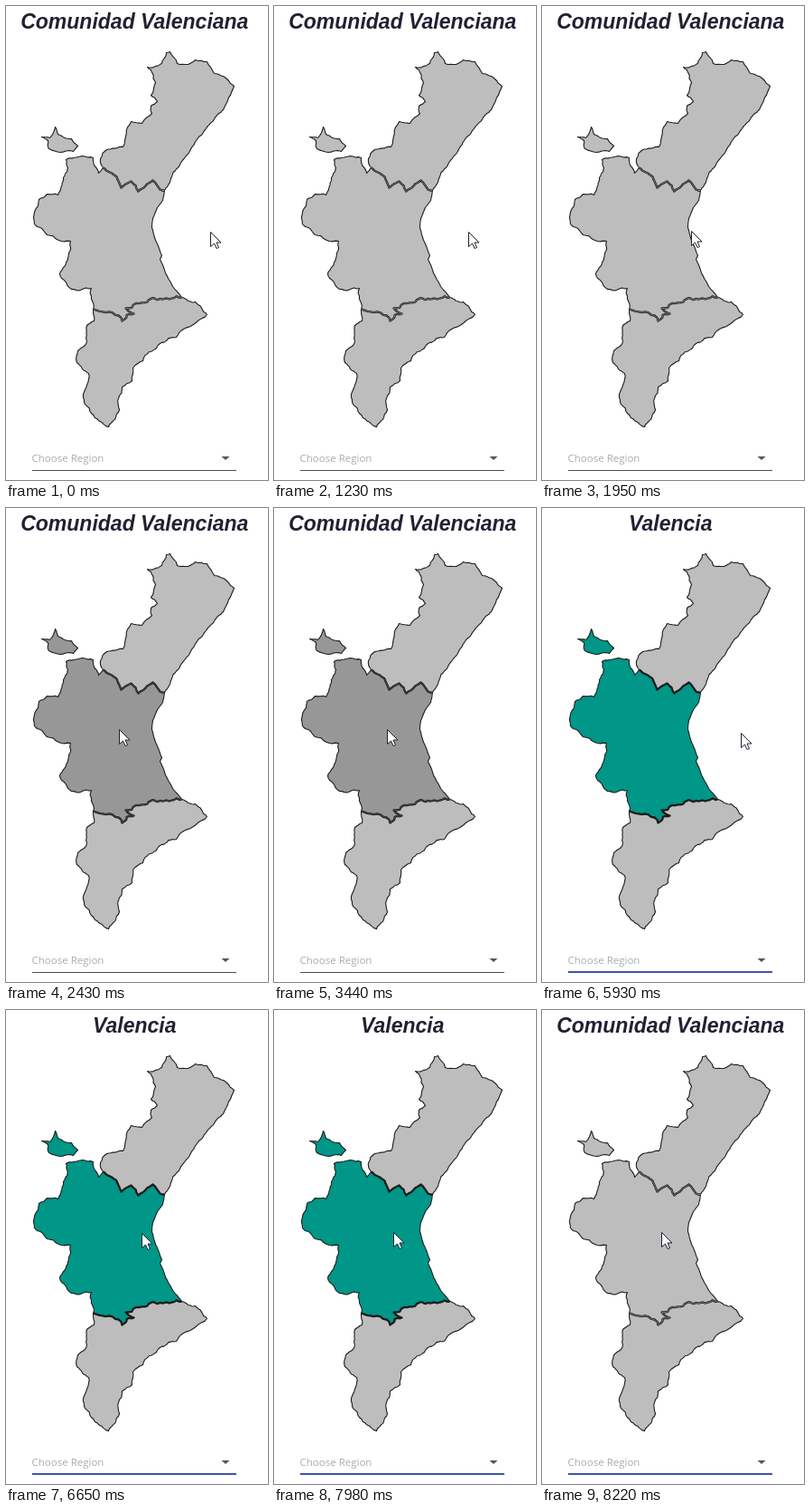
An HTML page with a canvas that plays this animation: 290x523 px, repeating every 9.3 s.

```html
<!DOCTYPE html>
<html lang="es">
<head>
<meta charset="utf-8">
<title>Region map</title>
<style>
html, body { margin: 0; width: 100%; height: 100%; overflow: hidden; background: #fff; }
canvas { display: block; width: 290px; height: 523px; }
</style>
</head>
<body>
<canvas id="stage"></canvas>
<script>
const W = 290, H = 523, LOOP = 9300;
const INK = '#1c1c1c', GREY = '#bdbdbd', HOVER = '#979797', TEAL = '#009688';
const HOVER_AT = 2030, SELECT_AT = 3670, RESET_AT = 8220;
const canvas = document.getElementById('stage');
const ctx = canvas.getContext('2d');
const ratio = window.devicePixelRatio || 1;
canvas.width = W * ratio;
canvas.height = H * ratio;

let seed = 11;
const random = () => (seed = (seed * 16807) % 2147483647) / 2147483647;

// Splits an edge at a shifted midpoint until the pieces are short.
function split(a, b, rough) {
  const dx = b[0] - a[0], dy = b[1] - a[1];
  if (Math.hypot(dx, dy) < 4) return [b];
  const shift = (random() - 0.5) * rough;
  const mid = [(a[0] + b[0]) / 2 - dy * shift, (a[1] + b[1]) / 2 + dx * shift];
  return [...split(a, mid, rough), ...split(mid, b, rough)];
}

// A natural-looking line through a few "x,y" key points.
function line(keys, rough = 0.25) {
  const pts = keys.split(' ').map(p => p.split(',').map(Number));
  return pts.flatMap((p, i) => i ? split(pts[i - 1], p, rough) : [p]);
}

const northWest = line('107,178 104,168 111,158 129,155 138,127 150,129 161,118 160,110 167,105 160,98 165,84 156,67 172,63 177,51');
const northEast = line('177,51 181,50 189,63 201,64 209,59 222,61 230,74 244,80 252,88', 0.2);
const northCoast = line('252,88 240,114 218,139 198,166 175,203', 0.15);
const northBorder = line('107,178 122,188 127,200 138,193 146,204 162,192 170,202 175,203');
const west = line('107,178 102,184 96,167 84,165 66,169 68,178 57,208 45,207 36,213 31,240 45,252 71,259 68,278 59,295 72,312 94,311 96,334');
const southBorder = line('96,334 124,341 128,347 141,339 132,333 156,326 172,323 194,321', 0.4);
const eastCoast = line('194,321 184,309 176,294 170,279 172,275 165,258 161,244 162,234 167,222 173,214 175,203', 0.06);
const south = line('194,321 209,326 222,340 196,356 188,365 158,381 151,391 140,399 139,413 128,420 125,445 113,464 94,449 85,428 91,405 78,393 79,380 87,374 89,352 97,347 96,334');
const islet = line('39,144 48,145 54,133 57,141 72,146 79,154 74,160 60,161 47,157 46,148 39,144', 0.2);

const back = pts => pts.slice().reverse();
const upper = [...northWest, ...northEast, ...northCoast, ...back(northBorder)];
const middle = [...west, ...southBorder, ...eastCoast, ...back(northBorder)];
const lower = [...south, ...southBorder];

function trace(pts) {
  ctx.beginPath();
  for (const [x, y] of pts) ctx.lineTo(x + 0.5, y + 0.5);
}

function stroke(color, width) {
  ctx.strokeStyle = color;
  ctx.lineWidth = width;
  ctx.stroke();
}

function region(pts, fill) {
  trace(pts);
  ctx.closePath();
  ctx.fillStyle = fill;
  ctx.fill();
  stroke(INK, 1.1);
}

function drawMap(fill) {
  region(upper, GREY);
  region(lower, GREY);
  region(middle, fill);
  region(islet, fill);
  for (const border of [northBorder, southBorder]) {
    trace(border);
    stroke(INK, 2.3);
    if (fill !== TEAL) stroke(fill === GREY ? '#909090' : '#555', 0.8);
  }
}

function drawTitle(text) {
  ctx.font = 'italic bold 23px "Liberation Sans", Arial, sans-serif';
  ctx.textAlign = 'center';
  ctx.fillStyle = '#212133';
  ctx.fillText(text, 142.3, 25);
}

function drawSelect(t) {
  ctx.font = '11.5px "Open Sans", "Noto Sans", sans-serif';
  ctx.textAlign = 'left';
  ctx.fillStyle = '#a6aeaa';
  ctx.fillText('Choose Region', 28.5, 503);

  ctx.fillStyle = '#555';
  ctx.beginPath();
  ctx.moveTo(238.5, 497);
  ctx.lineTo(247.5, 497);
  ctx.lineTo(243, 501);
  ctx.fill();

  ctx.fillStyle = '#4c4c4c';
  ctx.fillRect(29, 512, 226, 1);
  if (t >= SELECT_AT) {
    const half = 113 * Math.min(1, (t - SELECT_AT + 22) / 352);
    ctx.fillStyle = half < 113 ? '#2278b5' : '#3f56a8';
    ctx.fillRect(142 - half, 511, half * 2, 2);
  }
}

function drawCursor([x, y]) {
  ctx.save();
  ctx.translate(Math.round(x), Math.round(y));
  trace([[0, 0], [0, 16], [4, 12.5], [6.5, 18], [9, 17], [6.5, 11.5], [11.5, 11.5]]);
  ctx.closePath();
  ctx.fillStyle = '#fff';
  ctx.fill();
  stroke('#20202e', 1);
  ctx.restore();
}

// Progress of a move that advances once every 80 ms.
const stepped = (t, start, count) =>
  Math.max(0, Math.min(1, (Math.floor((t - start) / 80) + 1) / count));

function cursorAt(t) {
  if (t < 1000) return [226, 249];
  if (t < 4780) {
    const p = stepped(t, 1150, 17);
    const q = p - 0.05 * Math.sin(Math.PI * p);
    return [225 - 100 * q, 249 - 5 * q ** 4];
  }
  if (t < 5930) return [221, 248];
  const q = 1 - (1 - stepped(t, 6090, 12)) ** 1.45;
  return [220 - 88 * q, 248 - 3 * q];
}

function fillAt(t) {
  if (t < HOVER_AT || t >= RESET_AT) return GREY;
  return t < SELECT_AT ? HOVER : TEAL;
}

function render(t) {
  const fill = fillAt(t);
  ctx.setTransform(ratio, 0, 0, ratio, 0, 0);
  ctx.fillStyle = '#fff';
  ctx.fillRect(0, 0, W, H);
  ctx.lineJoin = 'round';
  drawTitle(fill === TEAL ? 'Valencia' : 'Comunidad Valenciana');
  drawMap(fill);
  drawSelect(t);
  drawCursor(cursorAt(t));
}

const began = performance.now();
function tick() {
  render((performance.now() - began) % LOOP);
  requestAnimationFrame(tick);
}
tick();
</script>
</body>
</html>
```
